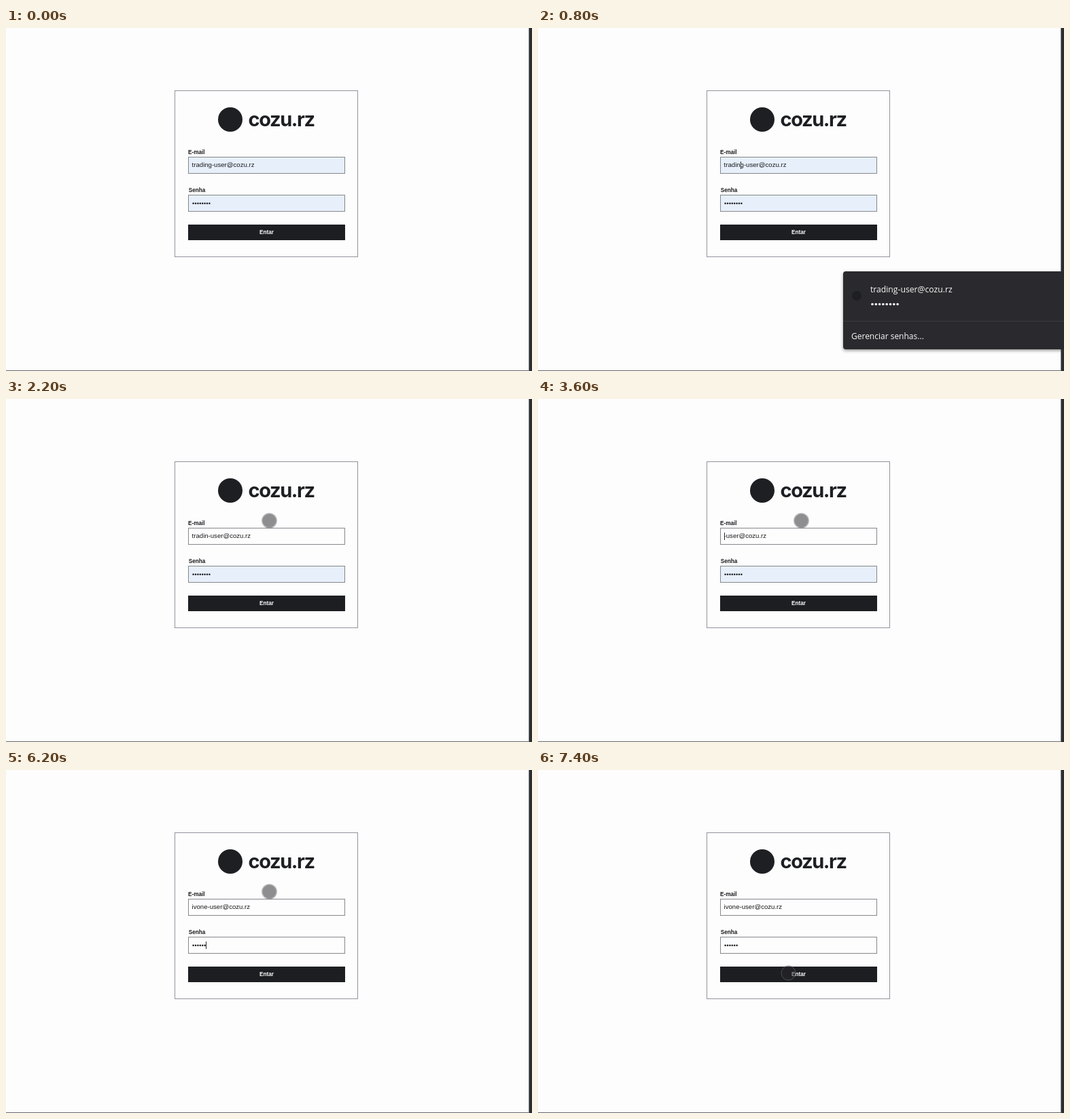
These frames come from a looping animation (774x506 px, 8 s). An HTML page:

```html
<!DOCTYPE html>
<html lang="pt">
<head>
<meta charset="utf-8">
<title>Login</title>
<style>
  html, body { margin: 0; width: 100%; height: 100%; overflow: hidden; background: #fdfdfd; }
  svg { display: block; width: 774px; height: 506px; }
  text { font-family: "Liberation Sans", Arial, sans-serif; fill: #1a1a1d; white-space: pre; }
  .brand { font: 700 29px Inter, sans-serif; letter-spacing: -1.4px; fill: #1e1f23; }
  .label { font-size: 8.2px; font-weight: 700; }
  .value { font-size: 9.6px; }
  .popup text { font-family: "Open Sans", "Noto Sans", sans-serif; font-weight: 500; fill: #fafafa; }
  .field { stroke: #85878c; }
  .caret { fill: #2a2a2e; }
</style>
</head>
<body>
<svg viewBox="0 0 774 506">
  <defs>
    <filter id="shadow" x="-5%" y="-10%" width="110%" height="125%">
      <feDropShadow dx="0" dy="2" stdDeviation="2" flood-color="#333" flood-opacity=".5"/>
    </filter>
  </defs>
  <rect width="774" height="506" fill="#fdfdfd"/>
  <rect y="505" width="774" height="1" fill="#66686c"/>
  <rect x="769" width="5" height="506" fill="#2b2d30"/>
  <rect x="769" width="1" height="506" fill="#77797c"/>

  <rect x="248.5" y="92.5" width="269" height="245" fill="#fdfdfd" stroke="#93939d"/>
  <circle cx="330" cy="135" r="18" fill="#1e1f23"/>
  <text class="brand" x="356.5" y="145">cozu.rz</text>

  <text class="label" x="268" y="186">E-mail</text>
  <rect class="field" id="emailBox" x="268.5" y="190.5" width="230" height="24"/>
  <text class="value" id="email" x="273.6" y="205"></text>
  <rect class="caret" id="emailCaret" y="197" width="1" height="11"/>

  <text class="label" x="268.7" y="242">Senha</text>
  <rect class="field" id="passBox" x="268.5" y="246.5" width="230" height="24"/>
  <g id="selection">
    <rect x="274" y="253" width="27" height="11" fill="#cfe4f5"/>
    <rect x="274" y="254" width="27" height="3.5" fill="#a6cdee"/>
    <rect x="274" y="260" width="27" height="3.5" fill="#a6cdee"/>
  </g>
  <g id="passDots" fill="#1a1a1d"></g>
  <rect class="caret" id="passCaret" y="253" width="1" height="11"/>

  <rect id="button" x="268" y="290" width="231" height="23"/>
  <text class="label" x="383.5" y="304" text-anchor="middle" style="fill:#fdfdfd">Entar</text>

  <g class="popup" id="popup">
    <rect x="449" y="359" width="340" height="115" rx="4" fill="#292b2e" filter="url(#shadow)"/>
    <rect x="449" y="432" width="325" height="1" fill="#3a3c40"/>
    <circle cx="469" cy="395" r="7" fill="#1e1f23"/>
    <text x="489" y="390" font-size="12.2">trading-user@cozu.rz</text>
    <g id="popupDots" fill="#fafafa"></g>
    <text x="461" y="459" font-size="12">Gerenciar senhas...</text>
  </g>

  <g id="pointer">
    <circle r="11.5" fill="#26262a" fill-opacity=".25"/>
    <circle r="10" fill="#26262a" fill-opacity=".35"/>
    <circle r="10.5" fill="none" stroke="#909094" stroke-opacity=".4"/>
  </g>
</svg>
<script>
const LOOP = 8000;
const FILLED = '#e6effa', PLAIN = '#fdfdfd', DARK = '#1d1e22', HOVER = '#2b2c31';
const REST = [387.5, 179.5];
const $ = id => document.getElementById(id);

// Each step changes only the listed properties; the rest carries over.
const steps = [
  { at: 0, name: 'trading', caret: null, emailFill: FILLED, dots: 8, passFill: FILLED,
    passCaret: false, selected: false, popup: false, pointer: null, button: DARK },
  { at: 400, pointer: [325, 212] },
  { at: 600, pointer: [298.5, 203] },
  { at: 800, pointer: null, caret: 6, popup: true },
  { at: 1000, pointer: REST },
  { at: 1200, caret: 7 },
  { at: 1600, caret: null },
  { at: 2200, popup: false, emailFill: PLAIN, name: 'tradin' },
  { at: 2400, name: 'tradi', caret: 5 },
  { at: 2600, name: 'trad', caret: 4 },
  { at: 2800, name: 'tra', caret: 3 },
  { at: 3000, name: 'tr', caret: 2 },
  { at: 3200, name: 't', caret: 1 },
  { at: 3600, name: '', caret: 0 },
  { at: 3800, name: 'iv', caret: 2 },
  { at: 4000, name: 'ivo', caret: 3 },
  { at: 4400, name: 'ivone', caret: 5 },
  { at: 4800, caret: null, selected: true },
  { at: 5400, selected: false, passFill: PLAIN, dots: 1, passCaret: true },
  { at: 5600, dots: 2 },
  { at: 5800, dots: 4 },
  { at: 6000, dots: 5 },
  { at: 6200, dots: 6 },
  { at: 6600, passCaret: false, pointer: null },
  { at: 7000, pointer: [368.5, 299.5] },
  { at: 7200, button: HOVER },
  { at: 7400, button: DARK },
];
const states = [];
steps.reduce((prev, step) => (states.push({ ...prev, ...step }), states.at(-1)), {});

function addDots(group, x, y, gap, r) {
  for (let i = 0; i < 8; i++) {
    const dot = document.createElementNS('http://www.w3.org/2000/svg', 'circle');
    dot.setAttribute('cx', x + i * gap);
    dot.setAttribute('cy', y);
    dot.setAttribute('r', r);
    group.append(dot);
  }
}
addDots($('passDots'), 275.6, 258.7, 3.4, 1.25);
addDots($('popupDots'), 492, 407.5, 5.3, 1.8);

const show = (id, on) => { $(id).style.display = on ? '' : 'none'; };

function draw(s) {
  const email = $('email');
  email.textContent = s.name + '-user@cozu.rz';
  $('emailBox').setAttribute('fill', s.emailFill);
  show('emailCaret', s.caret !== null);
  const typed = s.caret ? email.getSubStringLength(0, s.caret) : 0;
  $('emailCaret').setAttribute('x', Math.round(273.6 + typed));

  $('passBox').setAttribute('fill', s.passFill);
  [...$('passDots').children].forEach((dot, i) => {
    dot.style.display = i < s.dots && !s.selected ? '' : 'none';
  });
  show('selection', s.selected);
  show('passCaret', s.passCaret);
  $('passCaret').setAttribute('x', Math.round(273.9 + s.dots * 3.4));

  $('button').setAttribute('fill', s.button);
  show('popup', s.popup);
  show('pointer', s.pointer);
  if (s.pointer) $('pointer').setAttribute('transform', `translate(${s.pointer})`);
}

let current;
const start = performance.now();
function tick() {
  const time = Math.max(0, performance.now() - start) % LOOP;
  const state = states.findLast(s => s.at <= time);
  if (state !== current) draw(current = state);
  requestAnimationFrame(tick);
}
tick();
</script>
</body>
</html>
```
